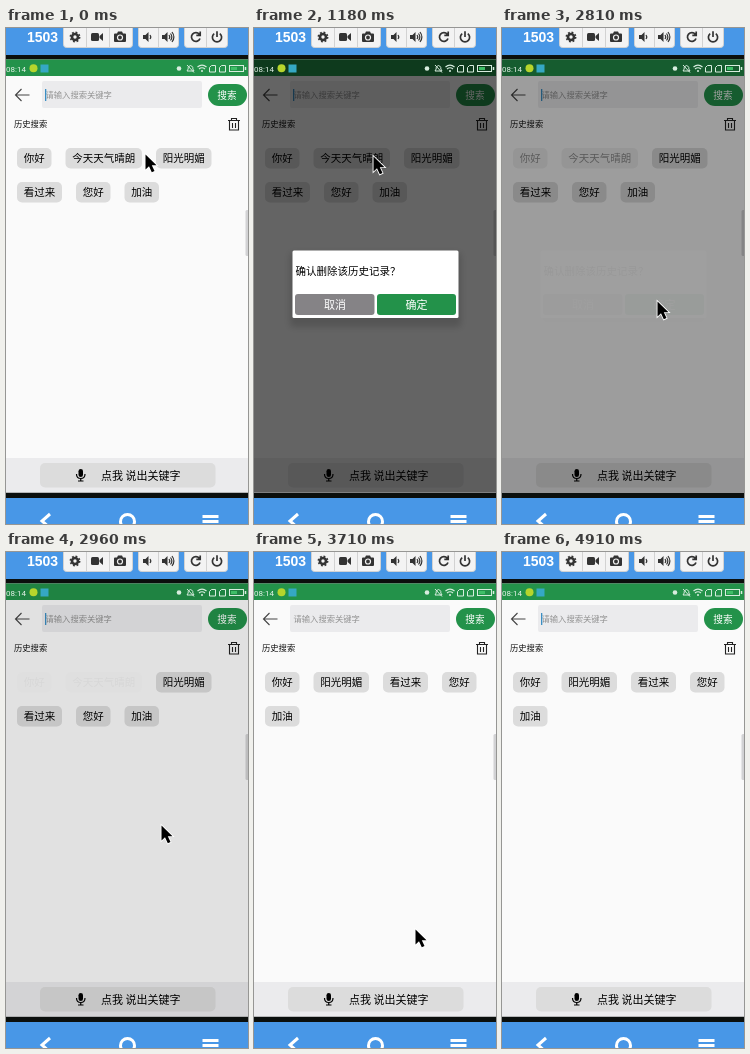
Write an HTML page that moves like this. It is 242 px wide and 496 px high and loops after 5050 ms.

```html
<!DOCTYPE html>
<html lang="zh-CN">
<head>
<meta charset="utf-8">
<title>历史搜索</title>
<style>
  html, body { margin: 0; width: 100%; height: 100%; overflow: hidden; background: #4897e7; }
  svg { display: block; width: 242px; height: 496px; font-family: "Noto Sans CJK SC", "Noto Sans CJK", sans-serif; }
  .mid { text-anchor: middle; }
  .chip rect { fill: #dcdcdc; }
  .chip text { font-size: 10.5px; }
  .keys rect { fill: #f3f3f3; stroke: #d2d2d2; }
  .keys path { stroke: #d2d2d2; }
  .icon { fill: #333; }
  .line { fill: none; stroke: #333; stroke-width: 1.7; }
</style>
</head>
<body>
<svg viewBox="0 0 242 496">
  <defs>
    <filter id="blur" x="-20%" y="-30%" width="140%" height="160%"><feGaussianBlur stdDeviation="3"/></filter>
  </defs>

  <!-- toolbar -->
  <rect width="242" height="28" fill="#4897e7"/>
  <text x="21" y="14" font-family="Liberation Sans, Arial, sans-serif" font-size="14" font-weight="700" fill="#fff">1503</text>
  <g class="keys">
    <rect x="57.5" y="-4" width="69" height="23.5" rx="3"/>
    <rect x="132.5" y="-4" width="40" height="23.5" rx="3"/>
    <rect x="178.5" y="-4" width="43" height="23.5" rx="3"/>
    <path d="M80.5 0V19M103.5 0V19M152.5 0V19M200.5 0V19"/>
  </g>
  <g class="icon">
    <circle cx="69" cy="9" r="3" fill="none" stroke="#333" stroke-width="2.6"/>
    <circle cx="69" cy="9" r="4.7" fill="none" stroke="#333" stroke-width="1.5" stroke-dasharray="1.85 1.84"/>
    <rect x="85" y="5" width="8" height="8" rx="1.5"/>
    <path d="M93.5 8L97 5V13L93.5 10Z"/>
    <path d="M109 5.5H111L112 3.5H116L117 5.5H119Q120 5.5 120 6.5V13Q120 14 119 14H109Q108 14 108 13V6.5Q108 5.5 109 5.5Z"/>
    <circle cx="114" cy="9.5" r="2.5" stroke="#f3f3f3" stroke-width="1.2"/>
    <path d="M137 7H139.5L142.5 4V14L139.5 11H137ZM156 7H158.5L161.5 4V14L158.5 11H156Z"/>
  </g>
  <g class="line">
    <path stroke-width="1.2" d="M144 7Q145.6 9 144 11M163 7Q164.6 9 163 11M164.5 5.5Q167.2 9 164.5 12.5M166 4Q169.8 9 166 14"/>
    <path d="M193.3 6.2A4.4 4.4 0 1 0 194 10.5M194.2 3.5V7.3H190.3"/>
    <path d="M208.2 5.6A4.6 4.6 0 1 0 213.8 5.6M211 3.3V9"/>
  </g>

  <!-- phone screen -->
  <rect y="27" width="242" height="443" fill="#0b0f0d"/>
  <rect y="31.5" width="242" height="433" fill="#fafafa"/>
  <rect y="31.5" width="242" height="16.5" fill="#23924a"/>

  <path d="M23.5 67H9.5M15.5 61L9.5 67L15.5 73" fill="none" stroke="#444" stroke-width="1.1"/>
  <rect x="36" y="53" width="160" height="27" rx="2" fill="#ebebed"/>
  <text x="39.5" y="70" font-size="8.3" fill="#929292">请输入搜索关键字</text>
  <rect id="caret" x="39" y="61" width="1.3" height="12" fill="#3b8fc4"/>
  <rect x="202" y="56" width="39" height="22" rx="11" fill="#23924a"/>
  <text class="mid" x="221" y="70.5" font-size="9.7" fill="#fff">搜索</text>
  <text x="8" y="99" font-size="8.3" fill="#111">历史搜索</text>
  <path d="M222 92.5H234M225.5 92V90.5H230.5V92M223.5 93V102H232.5V93M226.5 95V100M229.5 95V100" fill="none" stroke="#222" stroke-width="1.1"/>

  <g id="chips"></g>

  <rect y="430" width="242" height="34.5" fill="#ebebed"/>
  <rect x="34" y="435" width="175.5" height="24.5" rx="5" fill="#dcdcdc"/>
  <rect x="72.5" y="441" width="4.5" height="8" rx="2.25"/>
  <path d="M70.5 446Q70.5 450.5 74.75 450.5T79 446M74.75 450.5V453M72 453H77.5" fill="none" stroke="#000" stroke-width="1.2"/>
  <text x="95" y="452" font-size="11">点我 说出关键字</text>
  <rect x="239.5" y="182" width="4" height="46" rx="1.5" fill="#d2d2d4"/>

  <rect id="dim" y="31.5" width="242" height="433"/>

  <!-- status icons stay bright above the dimming -->
  <text x="0" y="43.5" font-family="Roboto, sans-serif" font-size="8" fill="#e4f2e8">08:14</text>
  <circle cx="27.5" cy="40.3" r="4" fill="#b6d52c"/>
  <rect x="34.5" y="36.5" width="8" height="8" fill="#35a8c4"/>
  <circle cx="173" cy="40.5" r="2.3" fill="#d8eddf"/>
  <rect x="225" y="39" width="6" height="3" fill="#3fbf68"/>
  <g fill="none" stroke="#d8eddf">
    <path d="M181 43H188L186.8 41V39.5Q184.5 35.5 182.2 39.5V41ZM181 37L188 44.5"/>
    <path d="M191.5 39Q196 35.2 200.5 39M193 41Q196 38.5 199 41" stroke-width="1.2"/>
    <path d="M205.5 37.5H209.5V44H203.5V39.5ZM215.5 37.5H219.5V44H213.5V39.5Z"/>
    <rect x="223.5" y="37.5" width="14" height="6"/>
    <path d="M239.5 39V42M195 43H197" stroke-width="1.5"/>
  </g>

  <g id="dialog">
    <rect x="36" y="225" width="171" height="74" rx="4" opacity=".15" filter="url(#blur)"/>
    <rect x="38.5" y="222.5" width="166" height="67.5" rx="1.5" fill="#fff"/>
    <text x="41.5" y="247" font-size="10.5">确认删除该历史记录？</text>
    <rect x="41" y="266" width="79.5" height="21" rx="3" fill="#858386"/>
    <rect x="123" y="266" width="79" height="21" rx="3" fill="#23924a"/>
    <g class="mid" font-size="11" fill="#fff">
      <text x="81" y="280.5">取消</text>
      <text x="162.5" y="280.5">确定</text>
    </g>
  </g>

  <!-- navigation bar -->
  <rect y="470" width="242" height="26" fill="#4897e7"/>
  <g fill="none" stroke="#fff" stroke-width="3">
    <path d="M44 486L36 493L44 500"/>
    <circle cx="121.5" cy="493.5" r="7"/>
    <path d="M196.5 488.5H212.5M196.5 493.5H212.5"/>
  </g>

  <path id="cursor" d="M.5 .5V15.5L4 12.2L6.8 18.3L9.5 17L6.8 11.2H11.5Z" stroke="#fff" stroke-width="1.7" paint-order="stroke"/>
</svg>
<script>
  const LOOP = 5050, FRAME = 148.7, LEAD = 17;
  const el = id => document.getElementById(id);
  const ramp = (from, to, t) => Math.min(1, Math.max(0, (t - from) / (to - from)));
  const smooth = p => p * p * (3 - 2 * p);
  const mix = (a, b, p) => a.map((v, i) => v + (b[i] - v) * p);
  const mod = (a, n) => (a % n + n) % n;

  // Chips sit in rows from left to right and wrap at the right margin.
  const chipWidth = label => label.length * 10.5 + 13.5;
  function flow(labels) {
    let x = 11, y = 120;
    return labels.map(label => {
      const width = chipWidth(label);
      if (x + width > 231) { x = 11; y += 34; }
      const spot = [x, y];
      x += width + 14;
      return spot;
    });
  }

  function makeChip(label) {
    const add = (parent, tag, attrs) => {
      const node = parent.appendChild(document.createElementNS("http://www.w3.org/2000/svg", tag));
      for (const key in attrs) node.setAttribute(key, attrs[key]);
      return node;
    };
    const width = chipWidth(label);
    const node = add(el("chips"), "g", { class: "chip" });
    add(node, "rect", { width, height: 20.5, rx: 5 });
    add(node, "text", { x: width / 2, y: 14, class: "mid" }).textContent = label;
    return node;
  }

  const labels = ["你好", "今天天气晴朗", "阳光明媚", "看过来", "您好", "加油"];
  const removed = 1;
  const chips = labels.map(makeChip);
  const before = flow(labels);
  const after = flow(labels.filter((_, i) => i !== removed));
  after.splice(removed, 0, before[removed]);

  // Pointer strokes: start, end, destination.
  const strokes = [
    [0, 170, [119, 128]],
    [1340, 1690, [155, 281]],
    [1950, 2200, [155, 273]],
    [3570, 3717, [161, 377]],
    [3717, 4015, [209, 599]]
  ];
  const pointer = t => strokes.reduce(
    (pos, [start, end, to]) => mix(pos, to, smooth(ramp(start, end, t))), [139, 126]);

  // The caret blinks, but stays lit while the dialog has the focus.
  function caretOn(t) {
    if (t > 1100 && t < 3300) return true;
    return mod(t - (t < 1100 ? 140 : 3415), 1040) >= 440;
  }

  const place = (node, [x, y]) => node.setAttribute("transform", `translate(${x} ${y})`);

  function draw(t) {
    el("caret").style.opacity = +caretOn(t);
    el("dialog").style.opacity = ramp(980, 1150, t) - ramp(2630, 2830, t);
    el("dim").style.opacity = 0.6 * (ramp(1060, 1180, t) - ramp(2700, 3030, t));

    const moved = smooth(ramp(3000, 3250, t));
    chips.forEach((chip, i) => place(chip, mix(before[i], after[i], moved)));
    const fade = 1 - ramp(2600, 2990, t);
    chips[0].style.opacity = fade + ramp(3180, 3400, t);
    chips[removed].style.opacity = fade;
    chips[removed].firstChild.style.fill = t > 590 && t < 1030 ? "#d2d2d2" : "";

    place(el("cursor"), pointer(t));
  }

  // Motion is sampled at a low, even frame rate.
  const begin = performance.now();
  function tick() {
    const t = (performance.now() - begin) % LOOP;
    draw(Math.floor((t + LEAD) / FRAME) * FRAME);
    requestAnimationFrame(tick);
  }
  tick();
</script>
</body>
</html>
```
